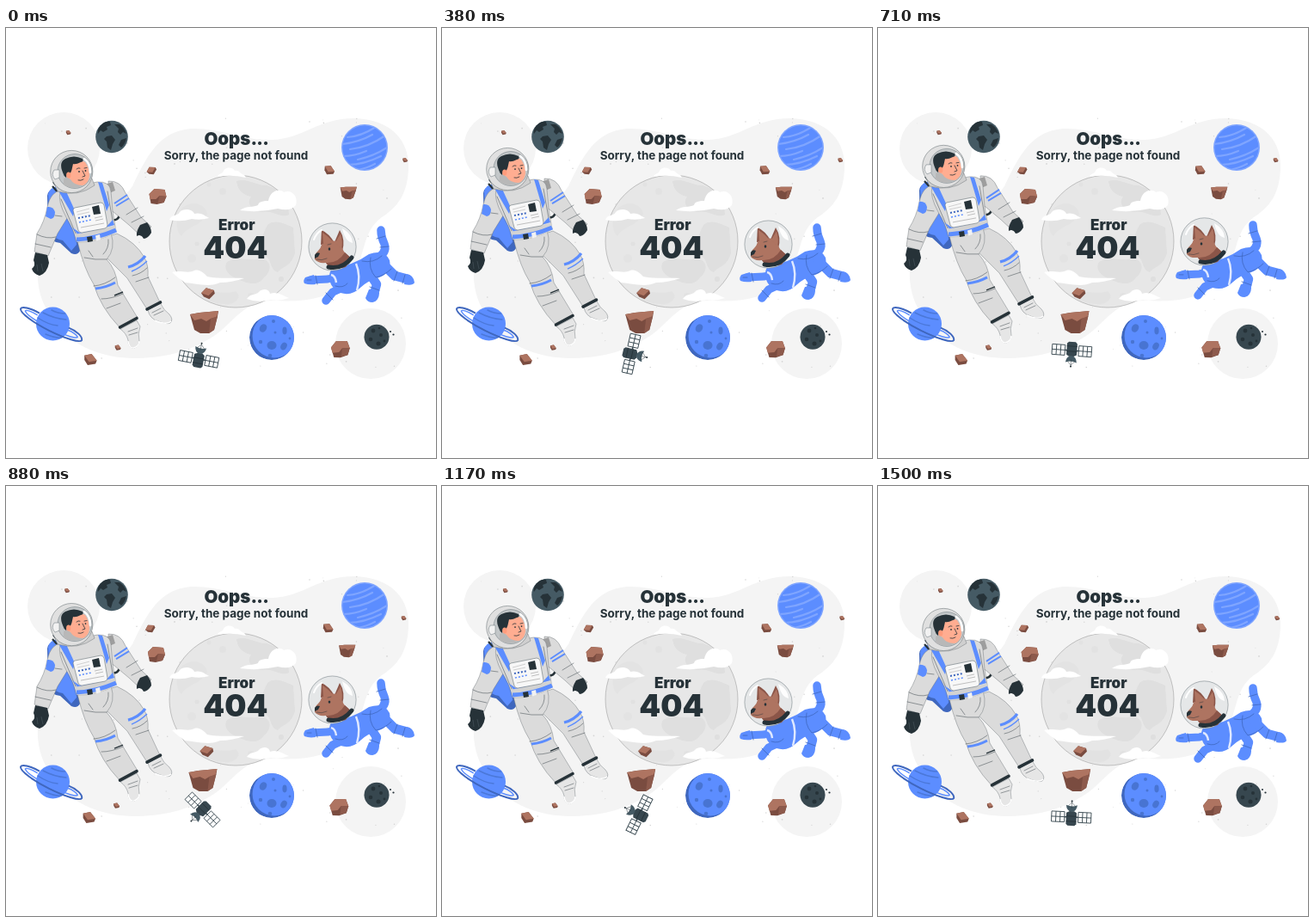
An HTML page that plays this animation: 500x500 px, repeating every 1540 ms.

```html
<!DOCTYPE html>
<html lang="en">
<head>
<meta charset="utf-8">
<title>Page not found</title>
<style>
html, body { margin: 0; width: 100%; height: 100%; overflow: hidden; background: #fff; }
svg { display: block; width: 100vw; height: 100vh; }
text { font-family: Inter, "Open Sans", sans-serif; fill: #263238; text-anchor: middle; }
.thin { fill: none; stroke: #263238; stroke-width: .45; stroke-linecap: round; stroke-linejoin: round; }
.suit { fill: #dbdbdb; stroke: #5d666a; stroke-width: .4; stroke-linejoin: round; }
.boot { fill: #e6e6e6; stroke: #5d666a; stroke-width: .4; stroke-linejoin: round; }
.band { fill: none; stroke: #5c8dff; stroke-width: 3.6; }
.dark { fill: #263238; }
.blue { fill: #5c8dff; }
.deep { fill: #3f67be; }
.limb { fill: none; stroke-linecap: round; stroke-linejoin: round; stroke: #5c8dff; }
.seam { fill: none; stroke: #3f67be; stroke-width: .8; stroke-linecap: round; }
</style>
</head>
<body>
<svg viewBox="0 0 500 500">
<defs>
  <clipPath id="moonClip"><circle cx="267" cy="248" r="77"/></clipPath>
  <clipPath id="stripeClip"><circle cx="417" cy="139" r="25.5"/></clipPath>
  <clipPath id="ballClip"><circle cx="309" cy="360" r="26"/></clipPath>
  <clipPath id="ringClip"><circle cx="54.5" cy="344" r="19.5"/></clipPath>
</defs>

<g fill="#f4f4f4">
  <circle cx="67" cy="140" r="42"/>
  <path d="M215 117C250 116 275 131 310 130C348 128 362 105 405 105C447 106 468 130 468 160C468 194 454 209 437 220C413 237 419 266 401 291C381 315 345 319 313 317C278 315 266 341 242 358C212 378 180 384 148 384C98 383 63 361 44 321C31 291 35 253 62 230C88 209 129 212 147 184C163 151 177 120 215 117Z"/>
  <circle cx="424" cy="367" r="41"/>
</g>
<g id="dots" fill="#d4d4d4"></g>

<!-- moon -->
<circle cx="267" cy="248" r="77" fill="#e7e7e7"/>
<g clip-path="url(#moonClip)" fill="#dfdfdf">
  <path d="M268 178C282 174 291 184 303 183C319 187 329 202 329 217C320 222 309 211 298 214C286 213 279 204 285 196C274 194 269 187 268 178Z"/>
  <path d="M304 229C314 221 326 229 334 232L336 262C331 278 323 276 316 284C306 281 310 269 301 265C293 251 299 239 304 229Z"/>
  <path d="M257 272C270 264 283 272 296 268C311 270 308 285 300 290C292 302 279 296 269 292C259 288 252 280 257 272Z"/>
  <path d="M205 209C218 199 232 205 234 216C228 230 211 230 204 242C196 235 198 218 205 209Z" opacity=".5"/>
  <path d="M225 309C239 304 255 310 267 306C276 313 266 323 253 321C239 320 230 315 225 309Z" opacity=".55"/>
  <circle cx="252" cy="190" r="4" opacity=".6"/><circle cx="236" cy="182" r="2.5" opacity=".6"/>
  <circle cx="216" cy="268" r="5" opacity=".5"/><circle cx="285" cy="312" r="4" opacity=".6"/>
  <circle cx="320" cy="292" r="3"/><circle cx="222" cy="251" r="2.5" opacity=".7"/>
</g>
<circle cx="267" cy="248" r="77" fill="none" stroke="#8f8f8f" stroke-width=".5"/>
<g fill="#fff">
  <path d="M246 173C248 168 252 170 253 166C256 161 264 162 266 166C271 165 272 169 275 170Q278 171 279 174Q262 170 246 173Z"/>
  <path d="M190 223C193 216 200 219 202 214C207 209 217 211 219 216C226 214 231 218 236 221Q226 224 216 222Q203 226 190 223Z"/>
  <path d="M272 212C280 206 288 209 293 206C294 201 302 201 305 201C307 189 318 186 323 191C333 187 340 197 337 206Q331 214 316 210Q294 215 272 212Z"/>
  <path d="M193 284C203 281 211 286 219 282C225 280 230 285 234 289C248 292 264 290 277 291Q262 296 249 296C237 302 221 297 208 296Q199 290 193 284Z"/>
  <path d="M280 315C285 308 290 311 294 307C299 302 306 304 307 309C315 306 321 311 329 314Q318 318 308 316Q293 320 280 315Z"/>
</g>

<!-- dark planets -->
<circle cx="123" cy="126.5" r="18.8" fill="#455a64"/>
<g class="dark">
  <path d="M108 116Q114 107 121 109L122 113L117 115L118 118L113 121L110 119L107 123Q106 119 108 116Z"/>
  <path d="M126 112L132 112Q139 117 140 123L136 121L133 124L130 121L131 117Z"/>
  <path d="M117 126L123 125L127 130L124 135L122 142L118 139L117 132L114 129Z"/>
  <path d="M134 130L140 128Q139 135 134 139L131 136Z"/>
</g>
<circle cx="431" cy="359.3" r="14.5" fill="#37474f"/>
<g class="dark">
  <circle cx="427" cy="352" r="2.4"/><circle cx="436" cy="357" r="2"/><circle cx="424" cy="362" r="2.3"/>
  <circle cx="433" cy="367" r="2.5"/><circle cx="440" cy="364" r="1.4"/><circle cx="434" cy="349" r="1.3"/>
  <circle cx="447" cy="353" r="1"/><circle cx="450.5" cy="356.5" r="1.1"/>
</g>

<!-- blue planets -->
<circle cx="417" cy="139" r="27" fill="#7fa5ff"/>
<circle cx="417" cy="139" r="25.5" class="blue"/>
<g clip-path="url(#stripeClip)" fill="none" stroke="#7fa5ff" stroke-width="2.2" stroke-linecap="round">
  <path d="M397 127Q413 126 430 115M391 135Q410 133 426 124M400 141Q421 139 441 125M392 149Q405 149 419 143M409 153Q428 149 443 139M398 159Q416 159 436 149M409 165Q420 163 429 158"/>
</g>
<g clip-path="url(#ballClip)">
  <circle cx="309" cy="360" r="26" class="deep"/>
  <circle cx="312" cy="358" r="25.5" class="blue"/>
  <g fill="#4874d2">
    <ellipse cx="299" cy="349" rx="4" ry="5" transform="rotate(30 299 349)"/>
    <ellipse cx="309" cy="369" rx="5.5" ry="5"/><ellipse cx="324" cy="352" rx="2.6" ry="4.4"/>
    <ellipse cx="323" cy="370" rx="3.5" ry="4.5" transform="rotate(30 323 370)"/>
    <circle cx="311" cy="341" r="2"/><circle cx="296" cy="365" r="2.2"/><circle cx="313" cy="354" r="1.5"/>
    <circle cx="307" cy="381" r="2.3"/><circle cx="330" cy="361" r="1.4"/>
  </g>
</g>
<circle cx="54.5" cy="344" r="19.5" class="blue"/>
<g clip-path="url(#ringClip)" fill="none" stroke="#4b78d9" stroke-width="1.5" stroke-linecap="round">
  <path d="M43 331Q56 338 70 339M37 337Q49 345 60 346M53 328Q60 332 69 332M46 356Q58 361 65 360"/>
</g>
<g transform="translate(52.8 344.2) rotate(26.5)" fill="none">
  <path d="M-18-5C-31-6 -40-3 -40 0C-39 5 -18 8 1 8C22 8 40 5 40 1C39-3 30-6 20-5" stroke="#3f67be" stroke-width="2"/>
  <path d="M-19-2C-27-3 -34-2 -34 0C-30 4 -14 5 1 5C18 5 33 3 34 0C32-2 26-3 20-2" stroke="#5c8dff" stroke-width="1.5"/>
</g>

<!-- titles -->
<text x="267.8" y="135.5" font-size="20.5" font-weight="900">Oops<tspan letter-spacing="-.7">...</tspan></text>
<text x="267.5" y="153" font-size="13.5" font-weight="700">Sorry, the page not found</text>
<text x="268.3" y="234.5" font-size="17" font-weight="900">Error</text>
<text x="266.8" y="267.5" font-size="35.5" font-weight="900">404</text>

<g id="rocks"></g>

<g id="probe">
  <path d="M-23 5H23" stroke="#37474f" stroke-width="1.5"/>
  <g id="panels" fill="#fff" stroke="#37474f" stroke-width=".9"></g>
  <path d="M-6 0L-2-2H3L6 0V13L4 15H-4L-6 13Z" fill="#37474f"/>
  <path d="M-6 4H6M-6 10H6" stroke="#263238" stroke-width=".8"/>
  <path d="M-6.5-9Q0-6 6.5-9Q6-2 0-1Q-6-2 -6.5-9Z" fill="#455a64"/>
  <path d="M0-6V-14M-4-8L0-12L4-8" class="thin"/>
  <circle cy="-13.5" r="1" class="dark"/>
</g>

<!-- astronaut -->
<g id="man">
  <path d="M57 188Q49 187 48 195L49 239Q52 249 63 250L76 262Q83 265 86 259L82 190Z" class="deep"/>
  <path d="M61 184Q50 185 49 194L52 238Q57 246 66 247L76 259L82 252L80 193Z" class="blue"/>
  <path d="M55 179L62 188M54 184L62 193" stroke="#263238" stroke-width="2.2"/>
  <path d="M120 184Q130 186 132 198L133 211L123 211Z" class="deep"/>
  <path d="M119 213Q131 207 132 216Q132 225 120 223" fill="none" stroke="#263238" stroke-width="2.6"/>

  <!-- right leg, then left -->
  <path d="M101 248L129 239Q151 249 161 267Q166 276 165 289L179 319L164 327L141 291L116 266Z" class="suit"/>
  <path d="M165 328L179.500 320Q183 328 190 333Q195 339 191 343Q187 345 177 341Q167 338 165 328Z" class="boot"/>
  <path d="M173 340Q187 346 192 341" fill="none" stroke="#fff" stroke-width="1.4"/>
  <path d="M170 331L180 326M172 334L183 329" class="thin"/>
  <path d="M164 327L179.5 319" stroke="#263238" stroke-width="3.6" stroke-linecap="round"/>
  <path d="M142 278Q154 275 162 265" class="band" style="stroke-width:3.2"/>
  <path d="M146 283Q156 279 164 271" class="band" style="stroke-width:1.4"/>
  <path d="M147 288Q157 286 164 279M151 295L166 290" class="thin"/>
  <path d="M83 248L122 238Q128 257 117 269Q128 281 130 299L153 337L132 348Q110 325 102 298Q91 281 83 248Z" class="suit"/>
  <path d="M133 350L152 340L156 347Q153 356 155 364Q153 373 147 372Q142 371 142 363Q140 355 133 350Z" class="boot"/>
  <path d="M142 364Q143 372 148 372Q154 371 155 364" fill="none" stroke="#fff" stroke-width="1.4"/>
  <path d="M142 353L153 349M143 357L153 354" class="thin"/>
  <path d="M132.5 348L152 337.5" stroke="#263238" stroke-width="3.6" stroke-linecap="round"/>
  <path d="M102 300Q115 299 127 290" class="thin"/>
  <path d="M104 303Q116 302 127 296" class="band" style="stroke-width:3"/>
  <path d="M111 315Q123 315 136 309M117 326L133 320M96 259L101 266M119 246Q120 256 113 263M91 267Q104 270 117 269" class="thin"/>
  <path d="M126 311L136 307" stroke="#263238" stroke-width="1.4"/>

  <!-- arms -->
  <path d="M119 178Q133 177 139 192L157 220L169 231L157 242L143 229L119 209Z" class="suit"/>
  <path d="M115 182L124 179L127 189L118 193Z" fill="#9e9e9e"/>
  <path d="M126 204L141 194M128 207L143 198" class="band" style="stroke-width:2"/>
  <path d="M140 217L153 209M146 226L160 219" class="thin"/>
  <path d="M156 229L164 226Q169 232 169 238Q165 245 160 245Q157 239 152 242Q151 237 156 229Z" class="dark"/>
  <path d="M64 189Q52 190 48 208Q45 225 36 239L33 260L49 265L60 239L73 218Z" class="suit"/>
  <path d="M48 208Q55 207 57 214Q57 221 52 222L46 219Z" class="blue"/>
  <path d="M57 218L65 219M36 240Q48 246 58 243M34 251L52 255" class="thin"/>
  <path d="M34 261L48 264L50 273Q48 285 39 288Q32 286 30 280Q35 276 32 270Z" class="dark"/>
  <path d="M41 274L43 283M36 275L37 283" stroke="#526168" stroke-width=".5"/>

  <!-- torso -->
  <path d="M63 190Q83 183 106 179Q121 178 122 190L124 213L128 237Q106 250 82 249Q79 234 70 220Q60 202 63 190Z" class="suit"/>
  <path d="M64 199L81 239M118 190L124 224" class="thin"/>
  <path d="M62 191L69 188L80 212L78 219Z" class="blue"/>
  <path d="M107 179L112 180L120 206L117 213Z" class="blue"/>
  <path d="M77 232L84 241L126 229L124 223L116 232L86 238Z" class="blue"/>
  <path d="M80 240L127 230L129 237Q106 251 83 249Z" fill="#d2d2d2"/>
  <path d="M82 246Q105 245 128 235" class="band" style="stroke-width:5"/>
  <path d="M94 243L100 242L101 248L95 249Z" class="dark"/>
  <path d="M104 241.5L109 240L110 246L105 247.5Z" fill="#f2f2f2"/>

  <path d="M80 209L110 203Q113 203 114 206L118 229Q118 232 115 233L88 238Q85 238 84 235L78 212Q78 210 80 209Z" fill="#f7f7f7" stroke="#69747a" stroke-width=".6"/>
  <path d="M100 208L108 206L110 216L102 217Z" class="dark"/>
  <path d="M82 214L97 210M83 217L97 214" stroke="#b5b5b5" stroke-width=".6"/>
  <path d="M84 221L99 218" stroke="#3f67be" stroke-width="2" stroke-dasharray="2 2"/>
  <path d="M85 226L99 223" stroke="#5c8dff" stroke-width="1.5" stroke-dasharray="2 2"/>
  <path d="M87 232L114 227M103 221L112 219M104 224L113 222" stroke="#b8b8b8" stroke-width=".9"/>

  <!-- helmet -->
  <path d="M56 181Q76 191 100 175L103 183Q84 197 60 190Z" fill="#cfcfcf" stroke="#5d666a" stroke-width=".4"/>
  <circle cx="76.3" cy="167" r="24.6" fill="#e0e0e0" stroke="#5d666a" stroke-width=".5"/>
  <circle cx="80" cy="166.5" r="20" fill="#c3c7c9" stroke="#69747a" stroke-width=".5"/>
  <path d="M67 175Q74 170 82 175L90 183Q77 189 67 182Z" fill="#b8b8b8"/>
  <path d="M73 160Q82 151 92 156Q97 163 97 172Q96 181 89 183Q79 183 75 176L69 172Z" fill="#ffad91"/>
  <path d="M66 168Q61 156 69 152Q79 147 89 152Q91 155 87 156Q81 159 78 158Q77 165 74 171L71 168L70 174Q67 172 66 168Z" class="dark"/>
  <ellipse cx="72.8" cy="171" rx="2.6" ry="3.5" fill="#ff9c7c"/>
  <path d="M82 164Q84 162 86 163M91 163L94 162.500M89 166L92 172L89 173M84 177Q87 178 90 176" class="thin" style="stroke-width:.8"/>
  <circle cx="85" cy="167" r=".9" class="dark"/><circle cx="92.5" cy="166" r=".9" class="dark"/>
  <path d="M91 152Q98 157 98 168" fill="none" stroke="#fff" stroke-width="2.6" stroke-linecap="round"/>
  <path d="M56 165Q52 171 57 176L62 174V165Z" fill="#f2f2f2" stroke="#69747a" stroke-width=".5"/>
</g>

<!-- dog -->
<g id="dog">
  <path d="M428 270Q444 262 440 251Q436 243 436 235" class="limb" stroke-width="9.5"/>
  <path d="M431 245L441 242M435 255L445 254" class="seam"/>
  <path d="M419 280L431 298L427 313" class="limb" stroke-width="10.5"/>
  <path d="M422 304Q429 302 434 308Q434 317 426 319Q420 319 418 314Z" class="blue"/>
  <path d="M423 301L434 305" class="seam"/>
  <path d="M390 288L374 292L354 293" class="limb" stroke-width="9"/>
  <path d="M358 287L360 298Q352 299 347 297Q345 294 348 290Z" class="blue"/>
  <path d="M360 288L362 298M350 293L355 293" class="seam"/>
  <path d="M380 279Q404 276 422 263Q440 257 446 270Q449 284 434 290Q420 294 412 302Q402 312 389 308Q376 302 376 289Q376 283 380 279Z" class="blue"/>
  <path d="M391 302L380 307L372 317" class="limb" stroke-width="9.5"/>
  <path d="M372 308L380 316M383 300Q392 303 397 297" class="seam"/>
  <path d="M437 273L452 288L467 292" class="limb" stroke-width="11"/>
  <path d="M465 286Q474 287 475 296Q473 300 463 298Z" class="blue"/>
  <path d="M455 283L451 294M464 287L461 297" class="seam"/>
  <path d="M407 274Q413 288 408 305M378 287Q383 288 384 296" fill="none" stroke="#e0e9ff" stroke-width="2.4"/>
  <path d="M424 267Q421 280 430 290Q440 288 448 280M414 271Q427 274 437 265" class="seam"/>

  <circle cx="379.5" cy="254.5" r="27.6" fill="#e5e7e8" stroke="#7c878c" stroke-width=".6"/>
  <path d="M382 249L388 235Q395 246 391 260Z" fill="#8b5548"/>
  <path d="M366 252L367 235Q376 239 382 250Z" fill="#8b5548"/>
  <path d="M367 252Q376 245 387 249L393 260L401 268L395 277Q385 281 375 277L372 273Q363 274 359 269Q358 263 363 259Q366 256 367 252Z" fill="#ae7461"/>
  <path d="M369 251L368 238Q376 243 381 250Z" fill="#ae7461"/>
  <path d="M383 249L389 239Q392 249 390 257Z" fill="#ae7461"/>
  <path d="M372 273Q386 274 394 261L402 268L395 278Q384 281 375 277Z" fill="#8b5548"/>
  <path d="M359 264Q361 260 365 262L363 266L359 268Z" class="dark"/>
  <path d="M361 269Q367 271 373 268M374 252L378 251" class="thin"/>
  <ellipse cx="376" cy="257" rx="1.3" ry="1.7" class="dark"/>
  <path d="M375 278Q391 281 402 267" fill="none" stroke="#263238" stroke-width="5" stroke-linecap="round"/>
  <path d="M391 233Q403 240 403 250Q394 248 391 233Z" fill="#fff" opacity=".9"/>
  <path d="M358 246Q361 238 367 235" fill="none" stroke="#fff" stroke-width="2" stroke-linecap="round"/>
</g>
</svg>

<script>
const LOOP = 1540, STEPS = 37;
const $ = id => document.getElementById(id);
const poly = (points, fill) => `<polygon points="${points}" fill="${fill}"/>`;
const LIGHT = "#ae7461", MID = "#8d5a4c", DARK = "#7a4c40";

const slab =
  poly("-17,-9 -6,-11 16,-13 15,-7 11,9 5,13 -5,13 -12,9", DARK) +
  poly("-17,-9 -6,-11 16,-13 14,-6 7,-4 2,-1 -4,-4 -12,-2", LIGHT) +
  poly("7,-4 15,-7 11,9 5,13", MID);
const chunk =
  poly("-10,-3 -4,-9 8,-8 10,0 7,7 -1,9 -8,8", DARK) +
  poly("-10,-3 -4,-9 8,-8 10,0 2,-1 -2,3 -9,3", LIGHT) +
  poly("2,-1 10,0 7,7 0,8", MID);
const shard =
  poly("-9,-6 2,-8 10,2 8,7 -4,9 -9,1", DARK) +
  poly("-9,-6 2,-8 10,2 -2,4", LIGHT);

// shape, x, y, scale, turn
const rocks = [
  [shard, 72.5, 121.5, .3, 0], [shard, 169.3, 165.5, .55, -50], [chunk, 176.5, 196, 1, 0],
  [shard, 235, 308, .74, -35], [slab, 231, 342, 1, 0], [shard, 98, 385.2, .76, 0],
  [shard, 130, 371.5, .36, 0], [shard, 376, 165, .62, 5], [slab, 398, 191.5, .58, 5],
  [shard, 464, 153.5, .3, 0], [chunk, 389, 373.5, 1.08, -6]
];
$("rocks").innerHTML = rocks.map(([shape, x, y, size, turn]) =>
  `<g transform="translate(${x} ${y}) rotate(${turn}) scale(${size})">${shape}</g>`).join("");

$("panels").innerHTML = [-23, 8].map(x =>
  `<path d="M${x}-1h15v12h-15zM${x} 5h15M${x + 5}-1v12M${x + 10}-1v12"/>`).join("");

let seed = 11;
const rnd = () => (seed = seed * 16807 % 2147483647) / 2147483647;
let dots = "";
for (let i = 0; i < 90; i++) {
  const x = 45 + rnd() * 415;
  const y = 105 + rnd() * 290;
  dots += `<circle cx="${x.toFixed(1)}" cy="${y.toFixed(1)}" r="${(.4 + rnd() * .5).toFixed(2)}"/>`;
}
$("dots").innerHTML = dots;

// [progress, value] pairs, joined by straight lines
const drift = [[0, 0], [.48, -1.6], [.66, -1.5], [.74, 1.2], [1, 0]];
const spin = [[0, 11], [.76, 297.5], [1, 371]];
function at(keys, p) {
  const i = keys.findIndex(key => p < key[0]);
  const [a, from] = keys[i - 1], [b, to] = keys[i];
  return from + (to - from) * (p - a) / (b - a);
}

function draw(ms) {
  const p = Math.floor(ms % LOOP / LOOP * STEPS + .1) % STEPS / STEPS;
  const lift = -3.1 * (1 - Math.cos(2 * Math.PI * p));
  const move = (id, value) => $(id).setAttribute("transform", value);
  move("man", `translate(0 ${lift})`);
  move("dog", `translate(0 ${lift})`);
  move("rocks", `translate(${at(drift, p)} 0)`);
  move("probe", `translate(225 380) rotate(${at(spin, p)})`);
}

function tick(now) {
  draw(now);
  requestAnimationFrame(tick);
}
draw(0);
requestAnimationFrame(tick);
</script>
</body>
</html>
```
